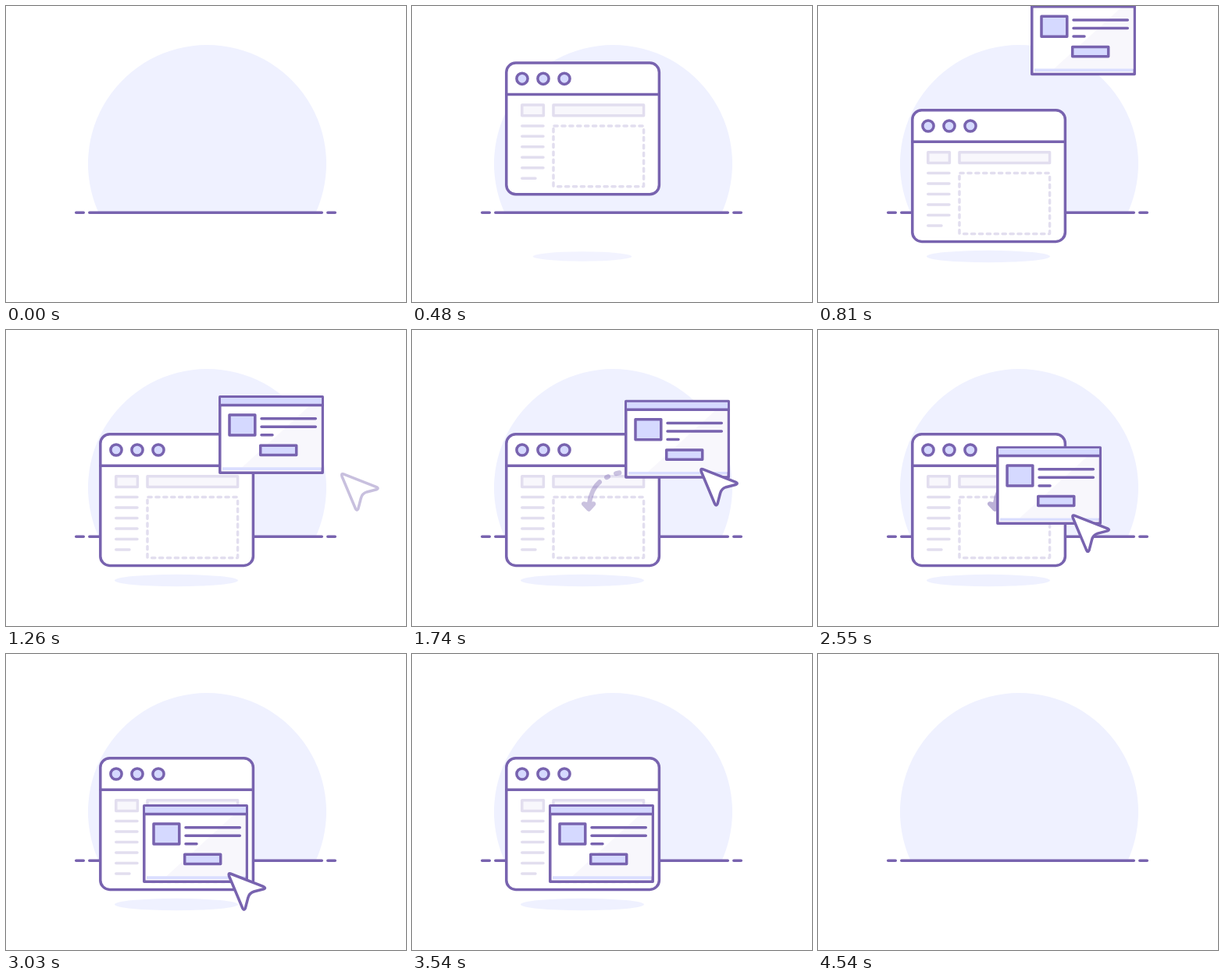
Recreate the animation shown at these times as an HTML page. Size 512 by 380 pixels, loop 4.57 s.

```html
<!DOCTYPE html>
<html lang="en">
<head>
<meta charset="utf-8">
<title>Drag and drop</title>
<style>
  html, body { margin: 0; height: 100%; overflow: hidden; background: #fff; }
  svg { display: block; width: 100vw; height: 100vh; }
  .ink { fill: none; stroke: #7863af; stroke-width: 3.5; stroke-linecap: round; stroke-linejoin: round; }
  .pale { stroke: #e2deef; }
  .white { fill: #fff; }
  .tint { fill: #d5d9ff; }
  .mist { fill: #f8f7fc; }
</style>
</head>
<body>
<svg viewBox="0 0 512 380">
  <path d="M118.4 265A152.5 152.5 0 1 1 396.6 265Z" fill="#eff1ff"/>
  <path class="ink" d="M89.7 265.2H99.3M106.8 265.2H404.3M411.8 265.2H421.3"/>

  <g id="scene">
    <ellipse id="shadow" rx="79" ry="7.7" fill="#eff1ff"/>

    <g id="page" class="ink">
      <rect class="white" x="120.8" y="133.8" width="195.6" height="168.6" rx="12"/>
      <path d="M121 174.2H316"/>
      <g class="tint">
        <circle cx="141" cy="154" r="7.1"/>
        <circle cx="168" cy="154" r="7.1"/>
        <circle cx="195" cy="154" r="7.1"/>
      </g>
      <g class="pale">
        <rect class="mist" x="140.8" y="187.7" width="27.6" height="13.8"/>
        <rect class="mist" x="181" y="187.7" width="115.6" height="13.8"/>
        <path d="M140.8 214.6H168M140.8 228H168M140.8 241.4H168M140.8 255H168M140.8 268.4H168M140.8 282H158"/>
        <rect x="181" y="214.6" width="115.6" height="77.8" rx="1" stroke-dasharray="4.2 5.7"/>
      </g>
    </g>

    <g id="arrow" class="ink" style="stroke-width:6">
      <path d="M226.8 223Q229.500 204 240 195.200M249 189.200L251 188.200M261 184.200L265.500 183.300"/>
      <path d="M220 223.200L226.400 224.600L232.300 223.200L226.400 229.800Z" fill="#7863af"/>
    </g>

    <g id="card" class="ink">
      <rect class="white" x="273.800" y="85.800" width="131.400" height="97.400"/>
      <g stroke="none">
        <path class="mist" d="M389 97H403.500V176.500H302Z"/>
        <path class="tint" d="M275 87H404V96H275Z"/>
        <path d="M277 176.300H403V180H277Z" fill="#dadeff"/>
      </g>
      <path d="M274 96.500H405"/>
      <rect class="tint" x="286" y="109" width="32.800" height="26"/>
      <path d="M327 113.700H396.300M327 124.200H396.300M327 134.800H341"/>
      <rect class="tint" x="325.700" y="148.300" width="46" height="12.200"/>
    </g>
  </g>

  <path id="cursor" class="ink white" d="M372 200L414.500 216.700Q418 218.500 414.500 219.800L402 223Q396 225 394.500 231L391 244.500Q389.300 248 387.600 244.500L370.200 203Q369 199 372 200Z"/>
</svg>
<script>
  const LOOP = 4570;
  const el = id => document.getElementById(id);
  const part = (t, from, to) => Math.min(1, Math.max(0, (t - from) / (to - from)));
  const move = (id, x, y, more = '') => el(id).setAttribute('transform', `translate(${x} ${y}) ${more}`);
  const fade = (id, a) => el(id).setAttribute('opacity', a);

  function draw(t) {
    // Page drops in while its shadow grows
    const drop = part(t, 0, 600);
    move('page', 0, -306 * (1 - drop));
    move('shadow', 218, 321.500, `scale(${drop})`);
    fade('shadow', drop);

    // Card drops in, is pulled down, then dragged into the slot
    const enter = part(t, 600, 1030);
    const pull = part(t, 1635, 2170);
    const drag = part(t, 2205, 2969);
    const x = -97 * drag;
    const y = 28.800 * pull + 80.200 * drag;
    move('card', x, y - 188 * (1 - enter));

    fade('arrow', part(t, 1640, 1900) * (1 - part(t, 2400, 2700)));

    // Cursor glides in, holds the card, then leaves to the right
    const come = part(t, 1040, 1590);
    const leave = 100 * (Math.max(0, t - 2993) / 247) ** 1.120;
    move('cursor', x + 100 * (1 - come) + leave, y - 27 + 20 * (1 - come));
    fade('cursor', leave > 260 ? 0 : come);

    fade('scene', 1 - part(t, 4270, 4540));
  }

  const start = performance.now();
  function tick() {
    draw((performance.now() - start) % LOOP);
    requestAnimationFrame(tick);
  }
  tick();
</script>
</body>
</html>
```
